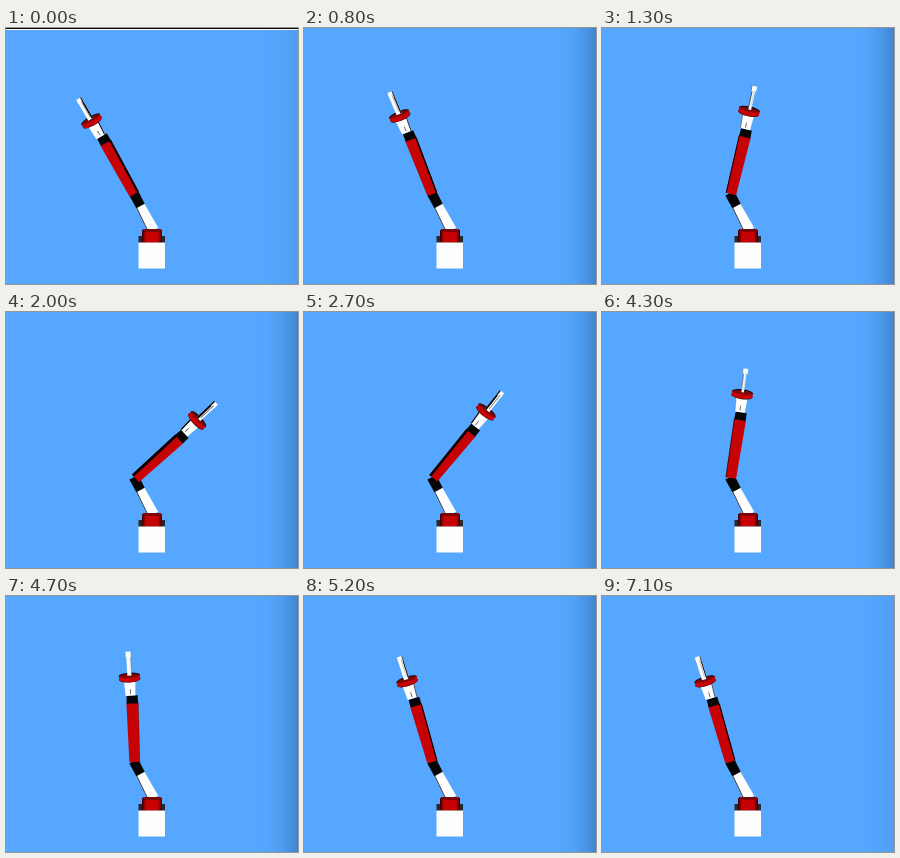
These frames come from a looping animation (292x256 px, 7300 ms). An HTML page with a canvas:

```html
<!DOCTYPE html>
<html lang="en">
<head>
<meta charset="utf-8">
<title>Robot arm</title>
<style>
html, body { margin: 0; width: 100%; height: 100%; overflow: hidden; background: #55a7ff; }
canvas { display: block; }
</style>
</head>
<body>
<canvas id="stage" width="292" height="256"></canvas>
<script>
const c = document.getElementById('stage').getContext('2d');
const LOOP = 7300, STEP = 100, RAD = Math.PI / 180;
const RED = '#c60205', DARK_RED = '#7c0508', BLACK = '#050505', WHITE = '#fdfdfd';

// Progress from 0 to 1 between two times
const ramp = (t, from, to) => Math.min(1, Math.max(0, (t - from) / (to - from)));

// One eased swing to the right, then a steady return with two rests
function angleAt(t) {
  const out = 1 - (1 - ramp(t, 700, 2000)) ** 1.3;
  const back = 6 * ramp(t, 2400, 3000) + ramp(t, 3400, 3500) + 16 * ramp(t, 3600, 5200);
  return -30.2 + 77 * out - 2.79 * back;
}

function box(fill, x, y, w, h) {
  c.fillStyle = fill;
  c.fillRect(x, y, w, h);
}

function disc(fill, y, rx, ry) {
  c.fillStyle = fill;
  c.beginPath();
  c.ellipse(0, y, rx, ry, 0, 0, 7);
  c.fill();
}

// Link from distance y0 to y1, tapering from width w0 to w1, with a dark strip on one side
function link(fill, y0, y1, w0, w1, strip = 0) {
  c.beginPath();
  c.moveTo(-w0 / 2, -y0);
  c.lineTo(-w1 / 2, -y1);
  c.lineTo(w1 / 2, -y1);
  c.lineTo(w0 / 2, -y0);
  c.closePath();
  c.fillStyle = fill;
  c.fill();
  if (!strip) return;
  const side = Math.sign(strip);
  c.beginPath();
  c.moveTo(side * w0 / 2 - strip / 2, -y0);
  c.lineTo(side * w1 / 2 - strip / 2, -y1);
  c.strokeStyle = BLACK;
  c.lineWidth = Math.abs(strip);
  c.stroke();
}

function turned(deg, paint) {
  c.save();
  c.rotate(deg * RAD);
  paint();
  c.restore();
}

function backdrop(dim) {
  box('#55a7ff', 0, 0, 292, 256);
  const shade = c.createLinearGradient(252, 0, 292, 0);
  for (let u = 0; u <= 1; u += 0.25) {
    shade.addColorStop(u, `rgba(10,40,80,${(dim ? 0.27 : 0.08) * u ** 2})`);
  }
  box(shade, 252, 0, 40, 256);
}

function base() {
  box('#26292e', 132.5, 208, 26.5, 7);
  const cap = c.createLinearGradient(136, 0, 156, 0);
  cap.addColorStop(0, '#300');
  cap.addColorStop(0.2, RED);
  cap.addColorStop(0.8, RED);
  cap.addColorStop(1, '#300');
  box(cap, 136, 202, 20, 12.5);
  box(DARK_RED, 137, 201, 18, 3);
  box(WHITE, 132.5, 214.5, 26.5, 26);
}

function lowerArm() {
  link(WHITE, 12, 40, 9, 11, 0.7);
  link(BLACK, -2, 12.5, 10, 9.5);
}

function upperArm(deg) {
  const lean = -Math.sin(deg * RAD);
  // The tool shows its broad face as it turns away from upright
  const stick = Math.min(5.4, 2.8 + Math.abs(deg - 8) / 8);

  turned(1.2, () => {
    link(RED, 1, 60, 10.5, 12, 4 * lean);
    link(BLACK, 59.5, 67.5, 11.5, 11);
  });
  link(WHITE, 67.5, 85, 10, 12, 2 * lean);
  box('#555', -0.4, -74, 0.8, 5);

  disc(BLACK, -87.5, 10.8, 3);
  disc(BLACK, -84, 10.8, 3.4);
  box(RED, -10.5, -87.5, 21, 4);
  disc(RED, -83.8, 10.4, 2.8);
  disc(DARK_RED, -87.5, 10.2, 2);

  link(WHITE, 87.5, 110, stick, stick, 3 * lean);
  link(WHITE, 106, 111.5, 5.2, 5.4, 2 * lean);
  box(`rgba(40,40,40,${Math.abs(lean)})`, 0.3, -108, 0.8, 18);
}

function draw(now) {
  const t = Math.floor(now % LOOP / STEP) * STEP;
  const deg = angleAt(t);
  backdrop(t >= 500 && t < 7100);
  if (t < 400) {
    box(BLACK, 0, 0, 292, 1);
    box(WHITE, 0, 1, 292, 1);
  }
  c.save();
  c.translate(128.7, 167);
  turned(152.2, lowerArm);
  turned(deg, () => upperArm(deg));
  c.restore();
  base();
}

const start = performance.now();
function tick() {
  draw(performance.now() - start);
  requestAnimationFrame(tick);
}
tick();
</script>
</body>
</html>
```
